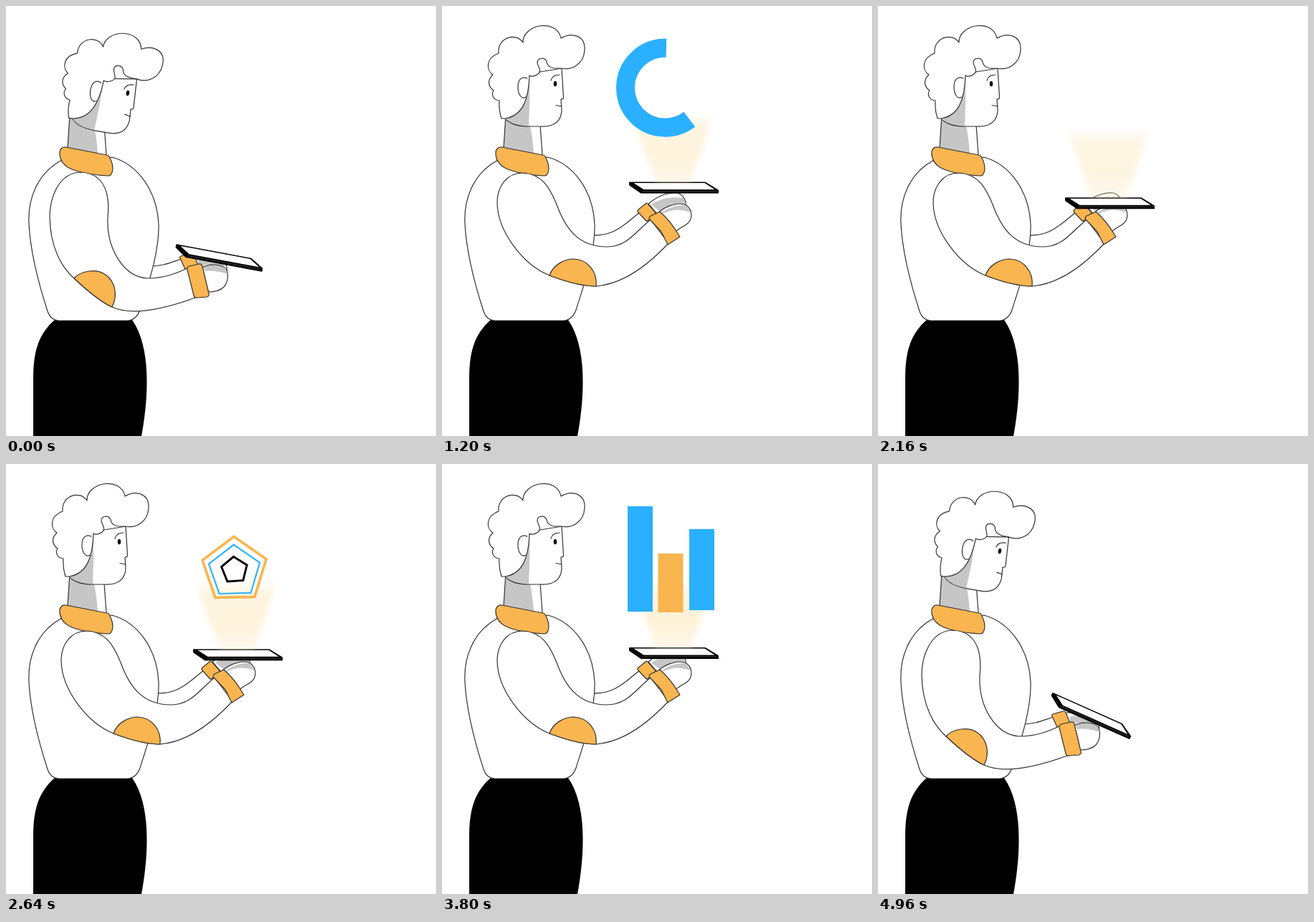
An HTML page for the animation above (5 s loop, 600 by 600 pixels).

```html
<!DOCTYPE html>
<html lang="en">
<head>
<meta charset="utf-8">
<title>Tablet hologram</title>
<style>
html, body { margin: 0; width: 100%; height: 100%; overflow: hidden; background: #fff; }
svg { display: block; width: 100vw; height: 100vh; }
.line { fill: none; stroke: #333; stroke-width: 1.2; stroke-linecap: round; stroke-linejoin: round; }
.skin { fill: #fff; }
.gold { fill: #f9b550; }
.shade { fill: #c6c6c6; }
</style>
</head>
<body>
<svg viewBox="0 0 600 600">
  <defs>
    <linearGradient id="glow" x1="0" y1="0" x2="0" y2="1">
      <stop offset="0" stop-color="#fdeac0" stop-opacity="0"/>
      <stop offset=".2" stop-color="#fdeac0" stop-opacity=".6"/>
      <stop offset=".6" stop-color="#fdeac0" stop-opacity=".7"/>
      <stop offset="1" stop-color="#fdeac0" stop-opacity=".4"/>
    </linearGradient>
    <filter id="soft" x="-20%" y="-20%" width="140%" height="140%"><feGaussianBlur stdDeviation="3"/></filter>
  </defs>

  <path d="M68 438C42 460 38 490 38 520V600H189C198 552 204 478 176 438Z"/>
  <path id="backArm" class="line"/>
  <path id="backHand" class="line skin"/>
  <path id="backShade" class="shade"/>
  <path id="backCuff" class="line gold"/>

  <path class="line skin" d="M78 215C46 232 30 266 32 304C34 344 47 392 58 426Q62 438 73 439H170Q182 438 187 424C197 392 214 345 213 305C211 258 184 221 148 211Z"/>
  <path class="skin" d="M89 150L86 199L140 209L137 165Z"/>
  <path class="shade" d="M89 150L86 199L128 207Q127 186 122 162Z"/>
  <path class="line" d="M89 152L86 198M137 166L140 208"/>
  <path class="line gold" d="M84 197L141 208Q143 208 145 212Q149 220 149 227Q148 237 143 237Q106 235 88 226Q74 218 75 203Q77 196 84 197Z"/>

  <g id="head">
    <path class="line skin" d="M167 87L169.500 127Q170 130 166 130L167 146C166 161 156 169 137 168L122 168C106 168 95 165 88 157L118 95Z"/>
    <path class="shade" d="M122 97Q123 132 121 167Q99 167 88 157C107 153 119 135 119 98Z"/>
    <path class="line skin" d="M83 157Q79 145 80 132C70 131 69 122 72 118C64 112 63 103 71 96C62 90 60 73 79 66C77 44 103 36 113 51C112 26 160 16 166 45C181 36 200 41 199 61C198 82 180 90 167 87C154 88 147 85 146 78C144 71 133 72 133 79C134 86 140 90 134 95Q126 100 122 97C121 130 113 153 88 157Z"/>
    <path class="line skin" d="M119 101C110 97 106 104 106 113C106 123 111 131 117 127"/>
    <path class="line" d="M152 104Q154 96 164 96M159 138.500L167 140"/>
    <ellipse id="eye" cx="158" cy="108.500" rx="2.200" ry="3.800"/>
  </g>

  <path id="arm" class="line skin"/>
  <path id="patch" class="line gold"/>
  <path id="hand" class="line skin"/>
  <path id="handShade" class="shade"/>
  <path id="cuff" class="line gold"/>

  <g id="phone">
    <path d="M-62-7H44L62 4V8H-46L-62-3Z" stroke="#000" stroke-linejoin="round"/>
    <path d="M-56-6H43L57 3H-42Z" fill="#fff"/>
    <path d="M-44 5.400H60" stroke="#777" stroke-width=".5"/>
  </g>

  <path id="beam" d="M-60-104H56L24-6H-24Z" fill="url(#glow)" filter="url(#soft)"/>
  <circle id="ring" r="55.500" pathLength="360" fill="none" stroke="#2ab0ff" stroke-width="26"/>
  <g id="pentagons" fill="none"></g>
  <g id="bars"></g>
</svg>
<script>
const LOOP = 5000, STEP = 40;
const $ = id => document.getElementById(id);
const put = (el, name, value) => el.setAttribute(name, value);
const smooth = u => (1 - Math.cos(Math.PI * u)) / 2;
const linear = u => u;

// value at time t on a [time, value] track
function at(t, track, ease = smooth) {
  if (t <= track[0][0]) return track[0][1];
  for (let i = 1; i < track.length; i++) {
    const [t0, a] = track[i - 1], [t1, b] = track[i];
    if (t < t1) return a + (b - a) * ease((t - t0) / (t1 - t0));
  }
  return track[track.length - 1][1];
}

// blend two paths that share the same commands
function mix(low, high, u) {
  const ends = high.match(/-?[\d.]+/g);
  let i = 0;
  return low.replace(/-?[\d.]+/g, n => (+n + (ends[i++] - n) * u).toFixed(2));
}

// limb shapes: arms lowered, arms raised
const limbs = {
  backArm: ['M196 363C220 364 234 356 248 352', 'M196 318C240 327 256 302 280 285'],
  backHand: ['M260 348C275 344 296 349 305 358C309 363 309 368 308 374L266 362Z',
             'M288 276C302 264 318 259 329 261C337 264 341 272 340 279L299 289Z'],
  backShade: ['M268 352C280 350 294 354 304 360L307 367L284 361L268 362Z',
              'M292 277C306 268 320 265 337 268L340 277Q322 276 303 286Z'],
  backCuff: ['M244 349Q242 350 243 352L249 365Q250 368 253 367L265 363Q268 362 267 359L262 347Q261 344 258 345Z',
             'M274 284Q272 286 274 288L284 299Q286 301 288 299L297 291Q299 289 297 287L288 277Q286 274 284 276Z'],
  arm: ['M105 232C75 232 61 265 61 295C62 338 78 365 95 380C111 395 130 412 148 420C172 431 212 426 264 407L255 365C238 373 221 380 197 380C165 378 140 340 142 295C145 266 140 234 105 232Z',
        'M113 233C90 233 77 252 77 275C78 315 113 361 150 376C171 384 193 391 215 391C252 388 288 361 316 331L291 298C268 317 258 336 230 336C190 336 172 310 160 277C151 255 140 234 113 233Z'],
  patch: ['M95 380C105 369 126 366 139 375C153 385 156 404 148 420C130 412 111 395 95 380Z',
          'M150 376C155 361 171 353 184 353C204 354 217 371 215 391C193 391 171 384 150 376Z'],
  hand: ['M274 365C284 359 300 360 307 367C311 374 310 385 304 392C299 397 290 399 282 399Z',
         'M302 288C314 278 331 273 341 278C350 285 350 298 342 304C337 308 331 310 326 315Z'],
  handShade: ['M276 365C286 360 300 361 307 367L309 374Q292 368 278 370Z',
              'M307 288C318 280 333 276 341 279L347 288Q327 280 307 290Z'],
  cuff: ['M256 363Q252 364 253 368L262 404Q263 408 267 407L280 406Q284 405 283 401L274 363Q273 359 269 360Z',
         'M291 293Q288 295 290 298Q306 315 313 329Q315 333 318 331L329 324Q332 322 330 319Q319 300 304 287Q302 284 299 286Z']
};

const pose = [[320, 0], [740, 1], [4680, 1], [4960, 0]];
const phoneX = [[320, 297.5], [740, 323.5], [4680, 323.5], [4960, 297.5]];
const phoneY = [[320, 351], [740, 264], [860, 268], [1540, 238], [2300, 278],
                [3120, 245], [4120, 269], [4680, 264], [4960, 351]];
const tilt = [[320, 10.5], [840, 0], [4680, 0], [4960, 24]];
const glow = [[560, 0], [740, 1], [1400, .75], [1700, .6], [2640, .8], [3240, 1], [4320, .8], [4640, 0]];
const sweep = [[540, 0], [760, 100], [1640, 338], [1720, 360]];
const ringY = [[540, 126], [760, 121.5], [1080, 111.5], [1400, 120], [1640, 119.5]];
const ringSize = [[1800, 1], [2150, 0]];
const pentY = [[2200, 152], [2640, 148], [3080, 139], [3240, 132]];
const blink = [[1900, 1], [1980, .1], [2060, 1], [3580, 1], [3660, .1], [3740, 1]];

function add(parent, tag, attrs) {
  const el = document.createElementNS('http://www.w3.org/2000/svg', tag);
  for (const name in attrs) put(el, name, attrs[name]);
  return parent.appendChild(el);
}

// radius, vertical offset, rotation, colour, line width
[[45, 0, -1, '#f9b550', 3.5], [36, 2, -1.5, '#2ab0ff', 2], [18, 0, -4, '#000', 2.8]]
  .forEach(([r, y, turn, stroke, width]) => {
    const points = [0, 1, 2, 3, 4].map(i => {
      const a = (i * 72 - 90 + turn) * Math.PI / 180;
      return [r * Math.cos(a), y + r * Math.sin(a)].map(n => n.toFixed(2));
    });
    add($('pentagons'), 'polygon', { points: points.join(' '), stroke, 'stroke-width': width });
  });

// left edge, base, full height, colour, start time
const bars = [[259, 206, 147, '#2ab0ff', 3320], [301.5, 207, 88, '#f9b550', 3400], [345, 204, 151, '#2ab0ff', 3480]]
  .map(([x, base, height, fill, start]) => ({
    el: add($('bars'), 'rect', { x, width: 35, fill }),
    base, height,
    track: [[start, 0], [start + 480, 1], [4220, 1], [4620, 0]]
  }));

function draw(t) {
  const p = at(t, pose), py = at(t, phoneY);
  for (const id in limbs) put($(id), 'd', mix(...limbs[id], p));
  put($('head'), 'transform', `rotate(${10 * (1 - p)} 90 183)`);
  put($('eye'), 'ry', 3.8 * at(t, blink));
  put($('phone'), 'transform', `translate(${at(t, phoneX)} ${py}) rotate(${at(t, tilt)})`);
  put($('beam'), 'transform', `translate(323 ${py})`);
  put($('beam'), 'opacity', at(t, glow));

  const arc = at(t, sweep, linear), size = at(t, ringSize);
  put($('ring'), 'visibility', arc > 0 && size > 0 ? 'visible' : 'hidden');
  put($('ring'), 'stroke-dasharray', arc < 360 ? `${arc} 400` : 'none');
  put($('ring'), 'transform', `translate(311.5 ${at(t, ringY)}) scale(${-size} ${size}) rotate(-91.5)`);

  const grow = t < 3080 ? at(t, [[2200, 0], [3080, 2.08]]) : at(t, [[3080, 2.08], [3270, 0]], linear);
  put($('pentagons'), 'visibility', grow > 0 ? 'visible' : 'hidden');
  put($('pentagons'), 'transform', `translate(318.8 ${at(t, pentY)}) scale(${grow})`);

  for (const bar of bars) {
    const h = bar.height * at(t, bar.track);
    put(bar.el, 'y', bar.base - h);
    put(bar.el, 'height', h);
  }
}

const begin = performance.now();
function tick() {
  const t = (performance.now() - begin) % LOOP;
  draw(Math.floor(t / STEP) * STEP);
  requestAnimationFrame(tick);
}
tick();
</script>
</body>
</html>
```
